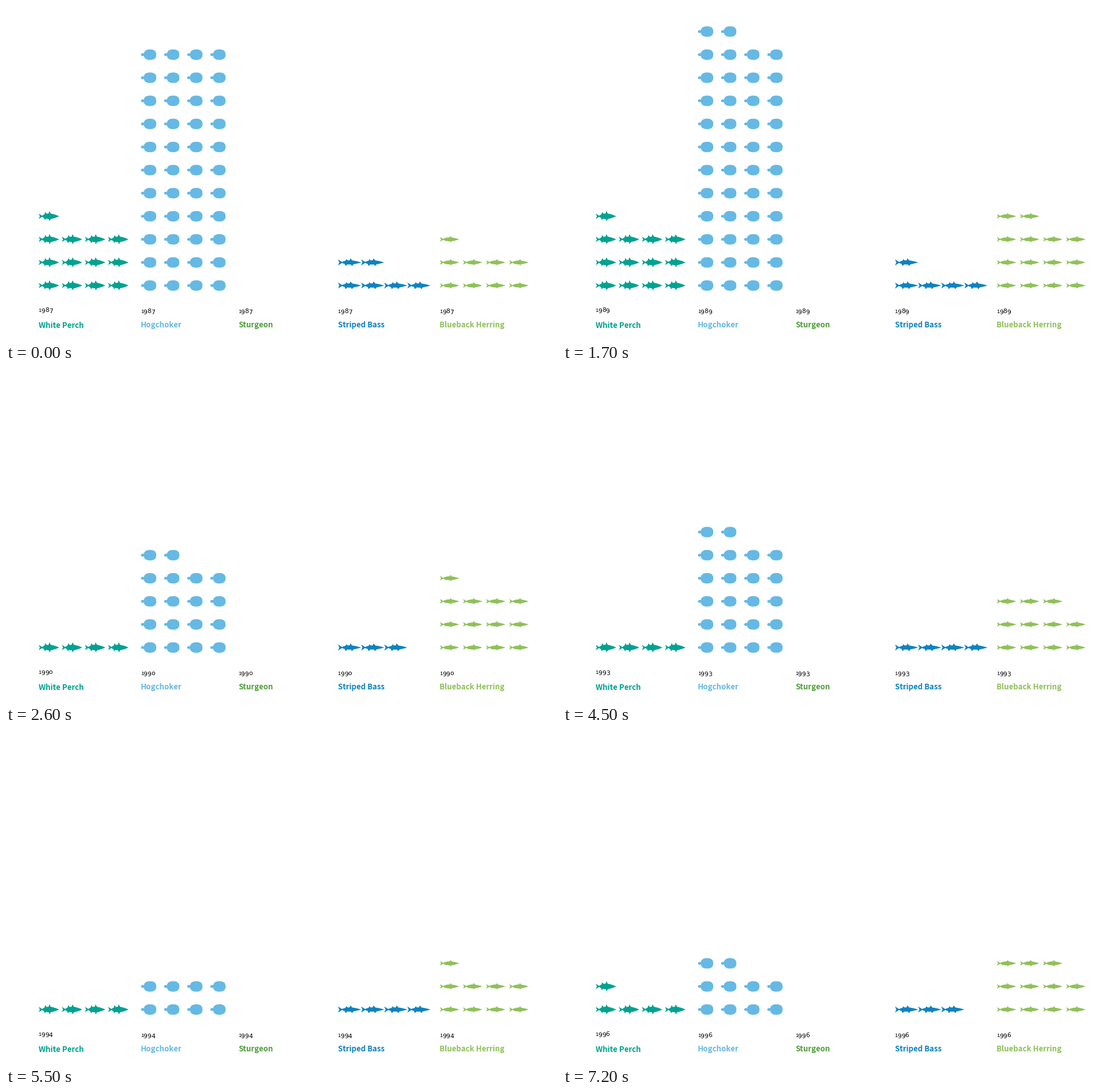
Recreate the animation shown at these times as a matplotlib script. Size 961 px wide and 583 px high, loop 8000 ms.

```python
import numpy as np
import matplotlib.pyplot as plt
from matplotlib.animation import FuncAnimation
from matplotlib.collections import PolyCollection

W, H, DPI = 961, 583, 100
STEP, LOOP = 100, 8000
PITCH, FLOOR, PER_ROW = 40.3, 487.9, 4
LABEL_FONT = ["Noto Sans CJK JP", "Liberation Sans"]
YEAR_AT = {0: 1987, 800: 1988, 1700: 1989, 2600: 1990, 3500: 1991,
           4500: 1993, 5500: 1994, 6400: 1995, 7200: 1996}


def outline(x, top, bottom, notch):
    """Closed shape between two profiles, with a notch in the tail."""
    upper = np.column_stack([x, -top])
    lower = np.column_stack([x, bottom])[::-1]
    return np.vstack([upper, lower, [(notch, 0)]])


def swimmer(length, depth, tail, dorsal, ventral):
    """Tapered body with a forked tail; fins are (position, height)."""
    x = np.linspace(0, 1, 81)
    u = np.clip((x - .15) / .85, 0, 1)
    body = depth * np.abs(np.sin(np.pi * u ** .8)) ** .9
    fork = np.interp(x, [0, .21], [tail, 0])

    def side(fins):
        peaks = [np.interp(x, [at - .07, at, at + .15], [0, height, 0])
                 for at, height in fins]
        return np.max([body, fork, *peaks], axis=0)

    return outline(x * length, side(dorsal), side(ventral), .06 * length)


def flatfish():
    """Rounded body with a small round tail."""
    x = np.linspace(0, 26.8, 135)

    def lobe(center, width, height, power):
        inside = np.clip(1 - np.abs((x - center) / width) ** power, 0, 1)
        return height * inside ** (1 / power)

    side = np.maximum(lobe(3.2, 3.2, 2.5, 2), lobe(15.9, 10.9, 9.1, 2.4))
    return outline(x, side, side, 0)


# name, colour, left edge, outline, fish in each year shown
SPECIES = [
    ("White Perch", "#00a291", 57,
     swimmer(35.6, 4.8, 4.7, [(.32, 7.6), (.52, 9.2)], [(.3, 6.6), (.53, 8.6)]),
     [13, 14, 13, 4, 6, 4, 4, 6, 5]),
    ("Hogchoker", "#65b9e4", 235.3, flatfish(),
     [44, 38, 46, 18, 25, 22, 8, 14, 10]),
    ("Sturgeon", "#4f9f3b", 405.3, None, [0] * 9),
    ("Striped Bass", "#0d83c0", 579,
     swimmer(40.2, 3.7, 5.3, [(.36, 5.8), (.54, 7.2)], [(.33, 6.4), (.6, 6.4)]),
     [6, 5, 5, 3, 3, 4, 4, 3, 3]),
    ("Blueback Herring", "#8fc159", 756.7,
     swimmer(33.7, 3.4, 4.1, [(.55, 6)], [(.3, 3.4), (.56, 5.4)]),
     [9, 16, 14, 13, 32, 11, 9, 8, 11]),
]


def points(pixels):
    return pixels * 72 / DPI


def shoal(shape, left, count):
    """Fish filling rows from the bottom up."""
    return [shape + (left + i % PER_ROW * PITCH, FLOOR - i // PER_ROW * PITCH)
            for i in range(count)]


def set_year(digits, year, x, baseline):
    """Old-style figures: low 0 and 1, hanging 3, 4, 5, 7 and 9."""
    for text, digit in zip(digits, str(year)):
        narrow = digit == "1"
        text.set_text("o" if digit == "0" else digit)
        text.set_family("Liberation Sans" if narrow else "DejaVu Sans")
        text.set_fontsize(points(9.5 if narrow else 10.8))
        text.set_position((x, baseline + 2 * (digit in "34579")))
        x += 4.8 if narrow else 6.7


fig = plt.figure(figsize=(W / DPI, H / DPI), dpi=DPI, facecolor="white")
ax = fig.add_axes([0, 0, 1, 1])
ax.set(xlim=(0, W), ylim=(H, 0))
ax.axis("off")

shoals, year_texts = [], []
for name, color, left, *_ in SPECIES:
    ax.text(left - .3, 561.5, name, color=color, family=LABEL_FONT,
            weight="bold", size=points(13.3), va="baseline")
    year_texts.append([ax.text(0, 0, "", color="black", va="baseline")
                       for _ in range(4)])
    shoals.append(ax.add_collection(
        PolyCollection([], facecolors=color, edgecolors="none"), autolim=False))


def update(frame):
    index = sum(start <= frame * STEP for start in YEAR_AT) - 1
    year = list(YEAR_AT.values())[index]
    for species, fish, digits in zip(SPECIES, shoals, year_texts):
        name, _, left, shape, counts = species
        set_year(digits, year, left - .5, 533.5 if name == "White Perch" else 536)
        fish.set_verts(shoal(shape, left, counts[index]))
    return shoals


anim = FuncAnimation(fig, update, frames=LOOP // STEP, interval=STEP,
                     repeat=True, repeat_delay=0, blit=False)
plt.show()
```
